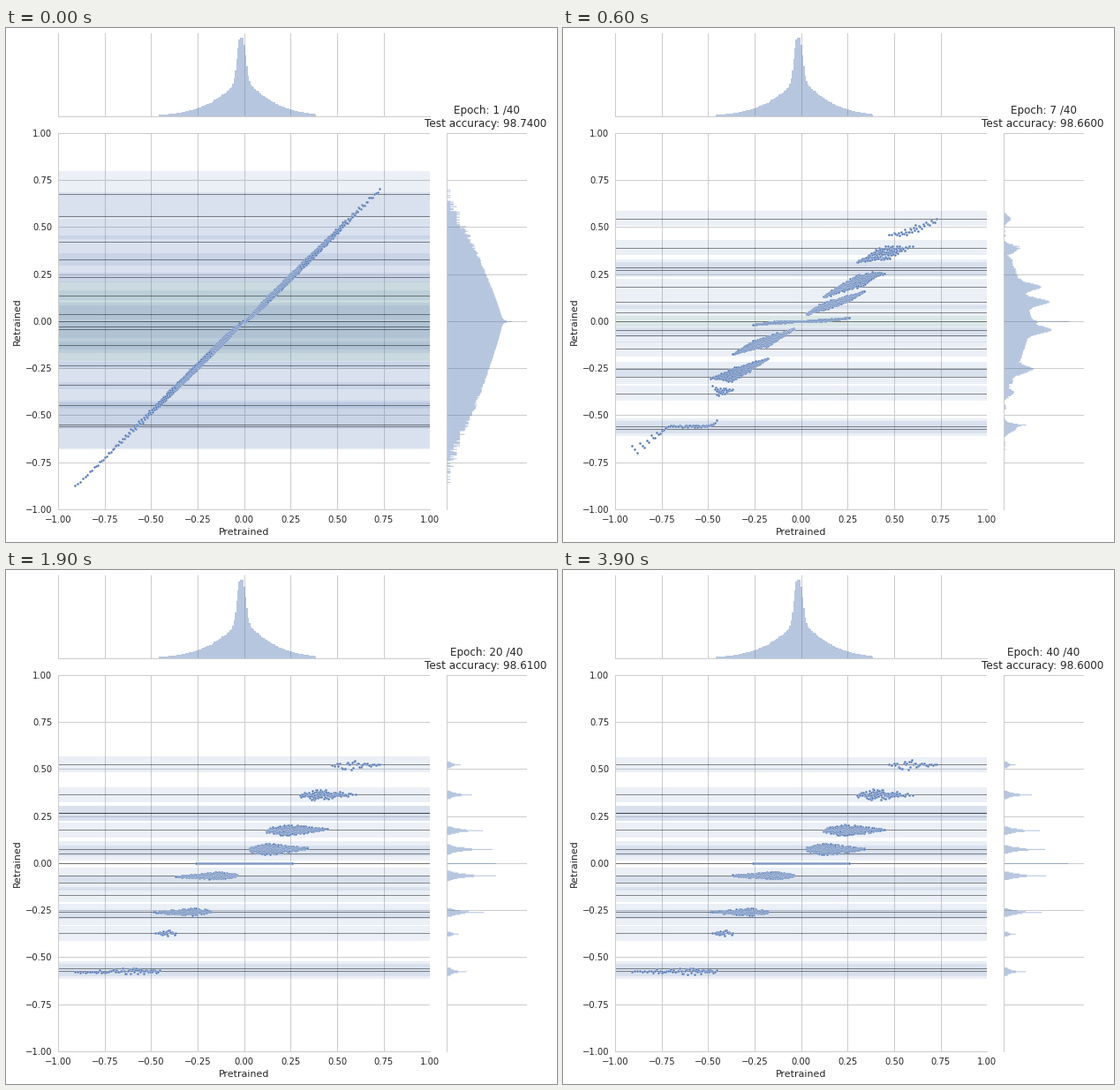
Animation of 624 by 582 pixels, one loop 4 s. Source, as a matplotlib script:

```python
import numpy as np
import matplotlib.pyplot as plt
from matplotlib.animation import FuncAnimation

W, H, EPOCHS = 624, 582, 40
BLUE, GREEN, GRID, INK = "#4C72B0", "#55A868", "#CCCCCC", "#262626"
plt.rcParams.update({"font.family": "DejaVu Sans", "text.color": INK,
                     "axes.labelcolor": INK, "axes.edgecolor": GRID,
                     "axes.linewidth": 1, "axes.axisbelow": True})
rng = np.random.default_rng(4)

# Where each mixture mean starts and settles
FIRST = np.array([.675, .56, .42, .33, .235, .135, .037, 0,
                  -.028, -.043, -.128, -.235, -.34, -.448, -.55, -.557])
LAST = np.array([.525, .364, .265, .265, .177, .075, .052, 0,
                 -.065, -.105, -.168, -.258, -.288, -.373, -.56, -.575])
ZERO, ZERO_END = 7, .26

# Per sign: mean index, first and last |x| of each cluster
CLUSTERS = {1: [(5, .03, .34), (4, .12, .45), (1, .30, .60), (0, .47, .73)],
            -1: [(8, .04, .37), (11, .18, .49), (13, .37, .48), (15, .455, .91)]}


def ease(t):
    t = np.clip(t, 0, 1)
    return t * t * (3 - 2 * t)


def means_at(n):
    """Outer means move at once, inner ones wait for a few epochs."""
    outer = 1 - np.exp(-n / 3)
    inner = ease((n - 4) / 4)
    return FIRST + (LAST - FIRST) * np.where(np.abs(FIRST) > .2, outer, inner)


def cluster_size(start, end):
    return int(2600 * (end - start) * np.exp(-start / .16))


def spread(start, end, count, weight):
    """Ordered positions whose density follows a weight function."""
    grid = np.linspace(start, end, 300)
    cum = np.cumsum(weight(grid))
    return np.interp(np.linspace(cum[0], cum[-1], count), cum, grid)


def golden(count):
    return np.arange(1, count + 1) * .618034 % 1


def start_line(x, v):
    width = .016 * np.interp(x, [0, .1, .55, .75], [.2, 1, 1, .35])
    return .975 * np.maximum(0, x - .008) + width * (2 * v - 1)


def early_band(x, u):
    """Wide diagonal band that bends and narrows outwards."""
    bent = np.minimum(x, .4 + .55 * (x - .4))
    hi = np.where(x < .4, x, bent) - .015
    lo = hi - .115 * np.clip((.85 - x) / .4, .1, 1)
    lo, hi = np.maximum(lo, 0), np.maximum(hi, 0)
    return lo + (hi - lo) * u


def early_tail(x, v):
    """Far negative weights: a flat shelf that droops at its end."""
    droop = np.maximum(0, x - .72) * (.85 + .65 * v)
    return .55 - .05 * np.exp(-(x - .455) / .02) + droop + .006 * (v - .5)


def build_points():
    rows = []

    def add(sign, x, v, early, leaf, index):
        rows.append(np.array([sign * x, sign * start_line(x, v), sign * early,
                              leaf, np.full(len(x), index)]))

    for sign, chain in CLUSTERS.items():
        x = np.arange(0, ZERO_END, .0022)
        v = golden(len(x))
        u = v * np.clip((ZERO_END - x) / (ZERO_END - chain[0][1]), 0, 1)
        add(sign, x, v, early_band(x, u), 0 * x, ZERO)

        prev_end = ZERO_END
        for k, (index, start, end) in enumerate(chain):
            last = k + 1 == len(chain)

            def limits(x):
                """Share of the band this cluster takes at x."""
                low = np.clip((prev_end - x) / (prev_end - start), 0, 1)
                if last:
                    return low, np.ones_like(x)
                return low, np.clip((end - x) / (end - chain[k + 1][1]), 0, 1)

            def weight(x):
                low, high = limits(x)
                fall = np.exp(-1.5 * (x - start) / (end - start))
                return (.12 + np.maximum(0, high - low)) * fall

            count = cluster_size(start, end)
            x = spread(start, end, count, weight)
            v = golden(count)
            low, high = limits(x)
            if last and sign < 0:
                early = early_tail(x, v)
            else:
                early = early_band(x, low + (high - low) * v)
            height = .03 if sign > 0 else .019
            peak = start + .3 * (end - start)
            leaf = np.interp(x, [start, peak, end], [.3, 1, .1]) * height
            leaf = leaf * np.clip(rng.normal(0, .5, count), -1, 1)
            add(sign, x, v, early, leaf, index)
            prev_end = end
    return np.concatenate(rows, axis=1)


PX, Y_START, Y_EARLY, LEAF, OWNER = build_points()
OWNER = OWNER.astype(int)


def points_at(n):
    """Spread into the band, then get pulled to the owning mean."""
    if n <= 4:
        return Y_START + (Y_EARLY - Y_START) * n / 4
    left = np.where(OWNER == ZERO, .02, .4) ** ((n - 4) / 4)
    goal = LAST[OWNER] + LEAF
    return goal + (Y_EARLY - goal) * left


# Side histogram, widths in pixels on a log scale
BINS = np.arange(-1, 1.0001, .005)
NOISE = rng.uniform(-1, 1, len(BINS))
ZERO_BAR = rng.uniform(18, 75, EPOCHS)
PEAKS = [(index, 12 * np.log(cluster_size(start, end)) - 27,
          rng.uniform(.88, 1.15, EPOCHS))
         for chain in CLUSTERS.values() for index, start, end in chain]


def ragged(w):
    """Short bars fall on coarse steps, as small counts do."""
    return np.where(w < 18, np.floor(np.maximum(w, 0) / 3.6) * 3.6, w)


def hist_early(n):
    t = n / 4
    a = np.abs(BINS)
    reach = np.where(BINS > 0, .68, .8)
    reach = reach + (.42 - reach) * t
    w = 63 * (1 - (a / reach) ** 1.2) + 6 * NOISE * (a / reach) ** 2
    w = ragged(w) + (10 + 13 * t) * np.exp(-a / .006)
    stray = (NOISE > .45) & (np.abs(BINS + .08) < .8 - .2 * t)
    w = np.where(stray, np.maximum(w, 3.6), w)
    return np.maximum(w, t * 43 * np.exp(-np.abs(BINS + .55) / .01))


def hist_late(n):
    settle = 1 - np.exp(-max(0, n - 8) / 3)
    mu = means_at(n)
    w = ZERO_BAR[n] * (np.abs(BINS) < .003)
    for index, top, wobble in PEAKS:
        d = np.abs(BINS - np.round(mu[index] / .005) * .005)
        wide = np.exp(-(d / .024) ** 2)
        sharp = .4 * np.exp(-(d / .017) ** 2) + .6 * np.exp(-d / .004)
        w = np.maximum(w, top * wobble[n] * (wide + (sharp - wide) * settle))
    return np.where(w < 2.5, 0, np.maximum(3.6, w * (1 + .12 * NOISE * (w < 25))))


def hist_at(n):
    mix = np.clip((n - 4) / 4, 0, 1)
    return hist_early(min(n, 4)) * (1 - mix) + hist_late(n) * mix


fig = plt.figure(figsize=(W / 72, H / 72), dpi=72, facecolor="white")


def panel(left, top, right, bottom, spines):
    ax = fig.add_axes([left / W, 1 - bottom / H, (right - left) / W,
                       (bottom - top) / H])
    for name, spine in ax.spines.items():
        spine.set_visible(name in spines)
    ax.tick_params(length=0, pad=7, labelsize=10, labelcolor=INK)
    return ax


ticks = np.arange(-1, 1.01, .25)
joint = panel(59.2, 118.9, 480.2, 544.9, ("left", "bottom"))
top = panel(59.2, 6.1, 480.2, 99.9, ("bottom",))
side = panel(499.2, 118.9, 590.2, 544.9, ("left",))

joint.set(xlim=(-1, 1), ylim=(-1, 1), xticks=ticks, yticks=ticks)
joint.xaxis.set_major_formatter("{x:.2f}")
joint.yaxis.set_major_formatter("{x:.2f}")
joint.set_xlabel("Pretrained", fontsize=11)
joint.set_ylabel("Retrained", fontsize=11)
joint.grid(color=GRID, lw=1)
top.set(xlim=(-1, 1), ylim=(0, 93), xticks=ticks, yticks=[])
top.grid(axis="x", color=GRID, lw=1)
top.tick_params(labelbottom=False)
side.set(xlim=(0, 91), ylim=(-1, 1), xticks=[], yticks=ticks)
side.grid(axis="y", color=GRID, lw=1)
side.tick_params(labelleft=False)

bx = np.arange(-.46, .391, .007)
bell = 42 * np.exp(-(np.abs(bx + .01) / .17) ** 1.25)
bell += 48 * np.exp(-(np.abs(bx + .015) / .031) ** 2.6)
top.fill_between(bx, 0, bell * (1 + rng.uniform(-.02, .02, len(bx))),
                 step="mid", color=BLUE, alpha=.4, lw=0)

bands = [joint.axhspan(0, .1, facecolor=GREEN if k == ZERO else BLUE,
                       alpha=.11, lw=0, zorder=1.5) for k in range(len(FIRST))]
rules = [joint.axhline(0, color="black", alpha=.55, lw=.8, zorder=2)
         for _ in FIRST]
dots = joint.scatter(PX, Y_START, s=8, c=BLUE, edgecolors="white",
                     linewidths=.25, zorder=3)
epoch_text = fig.text(544.5 / W, 1 - 97.3 / H, "", fontsize=12, ha="center")
score_text = fig.text(543.4 / W, 1 - 112.3 / H, "", fontsize=12, ha="center")
side_fill = []


def draw(n):
    half = .04 + .085 * np.exp(-.9 * n)
    for k, m in enumerate(means_at(n)):
        h = max(0, .21 - .03 * n) if k == ZERO else half
        bands[k].set_y(m - h)
        bands[k].set_height(2 * h)
        rules[k].set_ydata([m, m])
    dots.set_offsets(np.column_stack([PX, points_at(n)]))
    while side_fill:
        side_fill.pop().remove()
    side_fill.append(side.fill_betweenx(BINS, 0, hist_at(n), step="mid",
                                        color=BLUE, alpha=.4, lw=0))
    score = np.interp(n, [0, 4, 8, 19, 25, 32],
                      [98.74, 98.73, 98.58, 98.61, 98.59, 98.6])
    epoch_text.set_text(f"Epoch: {n + 1} /{EPOCHS}")
    score_text.set_text(f"Test accuracy: {round(score, 2):.4f}")
    return [dots, epoch_text, score_text, *bands, *rules, *side_fill]


anim = FuncAnimation(fig, draw, frames=EPOCHS, interval=100, repeat=True,
                     repeat_delay=0, blit=False)
plt.show()
```
